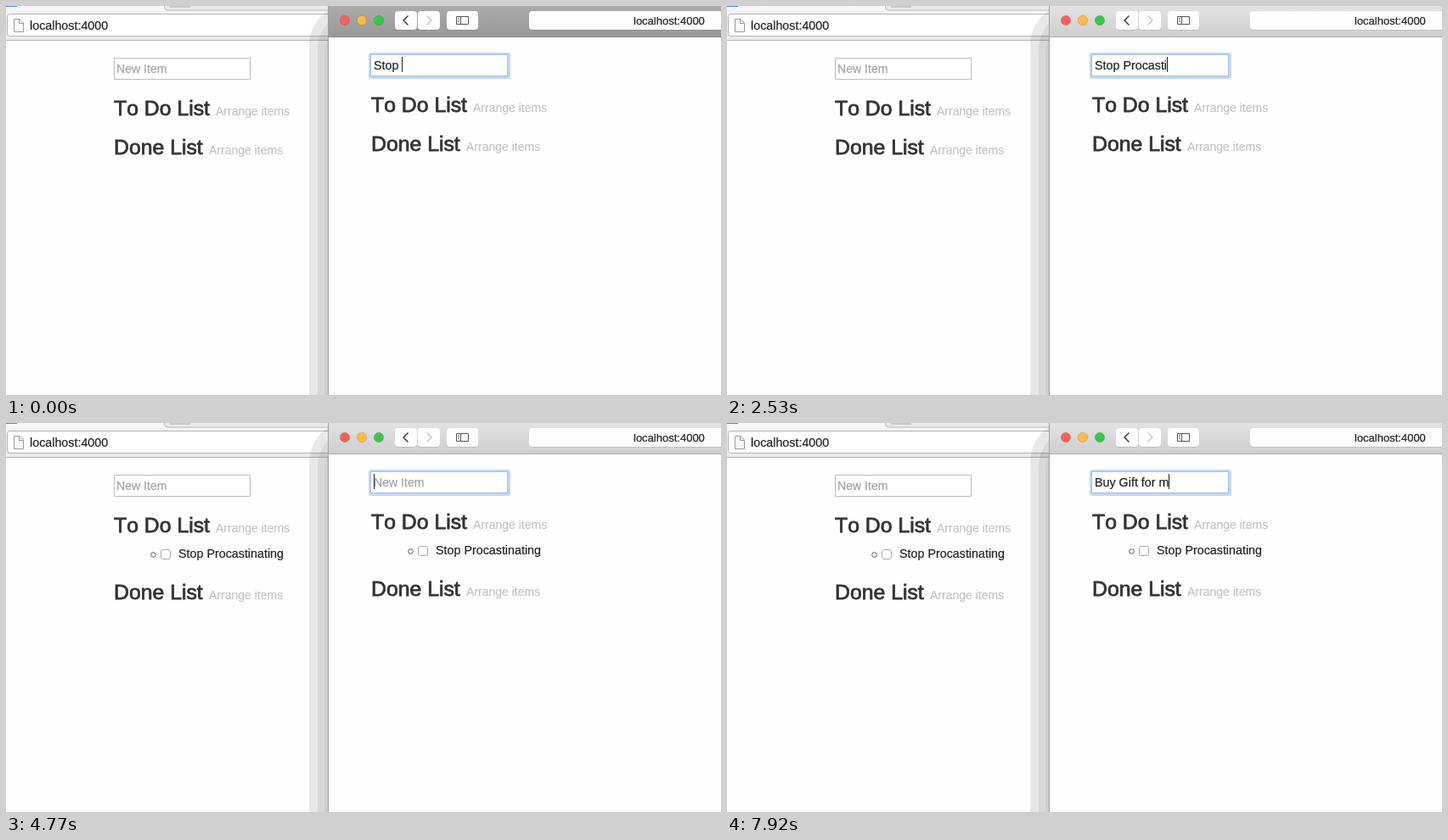
An HTML page with a canvas for the animation above (8 s loop, 842x459 px).

```html
<!DOCTYPE html>
<html lang="en">
<head>
<meta charset="utf-8">
<title>Shared to-do list</title>
<style>
  html, body { margin: 0; width: 100%; height: 100%; overflow: hidden; background: #fefefe; }
  canvas { display: block; }
</style>
</head>
<body>
<canvas id="stage" width="842" height="459"></canvas>
<script>
const ctx = document.getElementById('stage').getContext('2d');
const LOOP = 8000;
const ADDED = 3730;
const ITEM = 'Stop Procastinating';

// Contents of the input field, each from the given time on.
const typing = [
  [0, 'Stop '], [300, 'Stop P'], [600, 'Stop Pr'], [750, 'Stop Pro'],
  [890, 'Stop Proc'], [1040, 'Stop Procr'], [1340, 'Stop Pro'],
  [1490, 'Stop Proca'], [1640, 'Stop Procasi'], [1780, 'Stop Procas'],
  [2230, 'Stop Procast'], [2530, 'Stop Procasti'], [2680, 'Stop Procastin'],
  [2830, 'Stop Procastina'], [2980, 'Stop Procastinati'],
  [3430, 'Stop Procastinatin'], [3580, ITEM], [ADDED, ''],
  [5220, 'B'], [5370, 'Bu'], [5520, 'Buy'], [6120, 'Bu'], [6270, 'Buy'],
  [6420, 'Buy '], [6870, 'Buy G'], [7020, 'Buy Gi'], [7170, 'Buy Gif'],
  [7320, 'Buy Gift '], [7470, 'Buy Gift f'], [7620, 'Buy Gift for'],
  [7770, 'Buy Gift for '], [7920, 'Buy Gift for m']
];
// Title bar colours while the window gains focus.
const titleBar = [
  [0, '#ababab', '#999999'], [150, '#d6d6d6', '#c4c4c4'], [300, '#e2e2e2', '#cecece']
];
const at = (steps, t) => steps.findLast(step => step[0] <= t);

function rect(x, y, w, h, color) {
  ctx.fillStyle = color;
  ctx.fillRect(x, y, w, h);
}

function box(x, y, w, h, r, fill, stroke) {
  ctx.beginPath();
  ctx.roundRect(x, y, w, h, r);
  if (fill) { ctx.fillStyle = fill; ctx.fill(); }
  if (stroke) { ctx.strokeStyle = stroke; ctx.stroke(); }
}

function circle(x, y, r, fill, stroke) {
  box(x - r, y - r, 2 * r, 2 * r, r, fill, stroke);
}

function line(points, color, width = 1) {
  ctx.beginPath();
  points.forEach(([x, y]) => ctx.lineTo(x, y));
  ctx.strokeStyle = color;
  ctx.lineWidth = width;
  ctx.stroke();
  ctx.lineWidth = 1;
}

function vertical(y0, y1, top, bottom) {
  const gradient = ctx.createLinearGradient(0, y0, 0, y1);
  gradient.addColorStop(0, top);
  gradient.addColorStop(1, bottom);
  return gradient;
}

function text(string, x, y, size, color, weight = 0) {
  ctx.font = `${size}px "Liberation Sans", Arial, sans-serif`;
  ctx.fontKerning = 'none';
  ctx.fillStyle = ctx.strokeStyle = color;
  ctx.fillText(string, x, y);
  if (weight) {
    ctx.lineWidth = weight;
    ctx.strokeText(string, x, y);
    ctx.lineWidth = 1;
  }
}

function heading(title, x, y, linkX) {
  text(title, x, y, 24.8, '#333', 0.8);
  text('Arrange items', x + linkX, y, 14, '#c4c4c4', 0.2);
}

function lists(x, y, hasItem) {
  heading('To Do List', x, y, 120);
  if (hasItem) {
    circle(x + 46.5, y + 26.5, 2.8, null, '#555');
    box(x + 55.5, y + 20.5, 11, 11, 2.5, '#fff', '#aaa');
    text(ITEM, x + 76, y + 30, 14.3, '#222', 0.2);
  }
  heading('Done List', x, y + (hasItem ? 79 : 46), 112);
}

function leftWindow(hasItem) {
  rect(0, 0, 380, 40, vertical(0, 40, '#f8f8f8', '#ebebeb'));
  box(186.5, -8, 220, 13, 4, '#e9e9e9', '#b8b8b8');
  rect(193, 0, 24, 2, '#c8c8c8');
  rect(0, 0, 13, 1, '#4a87ee');
  box(1.5, 9.5, 400, 26, 3, '#fff', '#b2b2b2');
  rect(0, 40, 380, 1, '#b4b4b4');

  ctx.beginPath();
  [[9.5, 15.5], [16, 15.5], [20.5, 20], [20.5, 30.5], [9.5, 30.5]]
    .forEach(([x, y]) => ctx.lineTo(x, y));
  ctx.closePath();
  ctx.fillStyle = '#fafafa';
  ctx.fill();
  ctx.strokeStyle = '#999';
  ctx.stroke();
  line([[15.5, 15.5], [15.5, 20.5], [20.5, 20.5]], '#999');
  text('localhost:4000', 28, 28, 14.3, '#222', 0.2);

  box(127.5, 61.5, 160, 25, 0, '#fff', '#bdbdbd');
  text('New Item', 130, 79, 14.1, '#a5a5a5', 0.25);
  lists(127, 129, hasItem);

  // Stepped shadow cast by the window in front
  [[357, -2, 0.09], [367, 4, 0.065], [375, 10, 0.05]].forEach(([x, y, alpha]) =>
    box(x, y, 120, 600, 48, `rgba(0,0,0,${alpha})`));
}

function rightWindow(t, hasItem) {
  const [, top, bottom] = at(titleBar, t);
  rect(379, 0, 1, 459, '#a0a0a0');
  rect(380, 0, 462, 459, '#fefefe');
  rect(380, 0, 462, 36, vertical(0, 36, top, bottom));
  rect(380, 36, 462, 1, t < 150 ? '#858585' : '#acacac');

  ['#fc605b', '#fdbc40', '#34c84a'].forEach((color, i) =>
    circle(399 + 20 * i, 17, 5.7, color, 'rgba(0,0,0,.13)'));
  [[458, 26], [485, 26], [519, 37], [616, 240]].forEach(([x, w]) => {
    box(x, 6.7, w, 22, 4, 'rgba(0,0,0,.13)');
    box(x, 6, w, 22, 4, '#fdfdfd');
  });
  line([[473.5, 11.5], [468, 17], [473.5, 22.5]], '#444', 1.5);
  line([[495.5, 11.5], [501, 17], [495.5, 22.5]], '#c4c4c4', 1.3);
  box(530.5, 12.5, 14, 9, 0, null, '#555');
  line([[535.5, 12], [535.5, 22]], '#555');
  [14.5, 16.5, 18.5].forEach(y => line([[532, y], [534, y]], '#777'));
  text('localhost:4000', 739, 22, 13, '#222', 0.2);

  box(427, 55, 167, 31, 3, '#bddaf7');
  box(429.5, 57.5, 161, 25, 0, '#fff', '#a9bccd');
  const value = at(typing, t)[1];
  if (value) text(value, 433, 75, 14.3, '#222', 0.2);
  else text('New Item', 433, 75, 14.1, '#a5a5a5', 0.25);

  const caretHidden = t >= 4330 && t < 4770;
  if (!caretHidden) {
    ctx.font = '14.3px "Liberation Sans", Arial, sans-serif';
    const caretX = 433 + Math.round(ctx.measureText(value).width - 0.1);
    rect(caretX, 60, 1, 18, '#222');
  }
  lists(430, 125, hasItem);
}

function draw(now) {
  const t = now % LOOP;
  const hasItem = t >= ADDED;
  rect(0, 0, 842, 459, '#fefefe');
  leftWindow(hasItem);
  rightWindow(t, hasItem);
  requestAnimationFrame(() => draw(performance.now() - start));
}

const start = performance.now();
draw(0);
</script>
</body>
</html>
```
